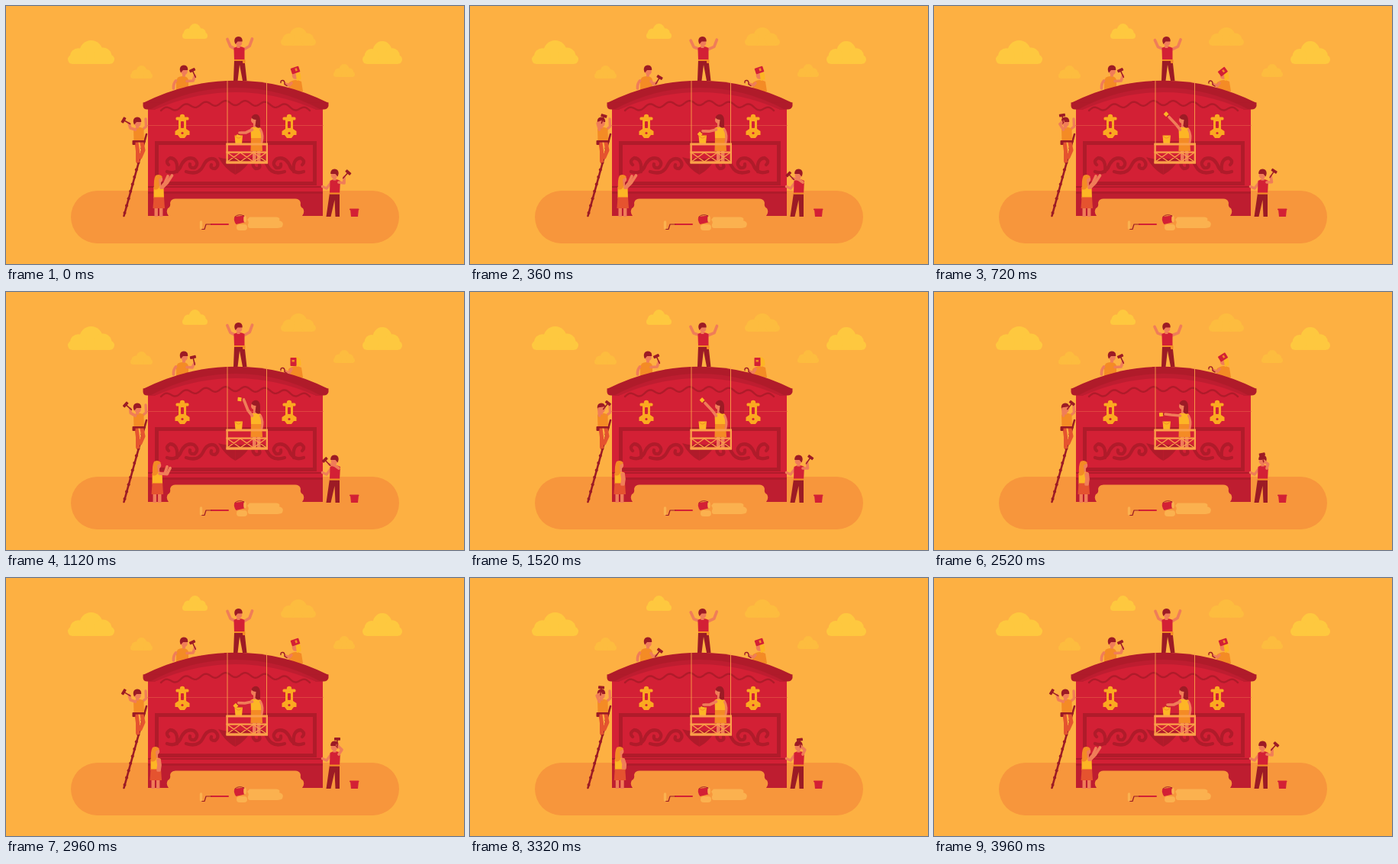
An HTML page that plays this animation: 600 by 338 pixels, repeating every 4000 ms.

```html
<!DOCTYPE html>
<html lang="en">
<head>
<meta charset="utf-8">
<title>Chest builders</title>
<style>
html, body { margin: 0; width: 100%; height: 100%; overflow: hidden; background: #fdb042; }
svg { display: block; width: 100%; height: 100%; }
</style>
</head>
<body>
<svg id="stage" viewBox="0 0 600 338"></svg>
<script>
const C = {
  sky: '#fdb042', ground: '#f7963c', red: '#d32035', deep: '#be1d30', dark: '#b01b2a',
  maroon: '#9c1b25', skin: '#f07d58', gold: '#fdb525', brass: '#fba920', orange: '#f48b25',
  coral: '#e5532f', cloud: '#fec83f', pale: '#fdbc3f', rope: '#fba149', puddle: '#fbb14f'
};

// Markup helpers
const path = (d, fill) => `<path d="${d}" fill="${fill}"/>`;
const line = (d, color, w, id = '') =>
  `<path id="${id}" d="${d}" fill="none" stroke="${color}" stroke-width="${w}" stroke-linecap="round" stroke-linejoin="round"/>`;
const rect = (x, y, w, h, fill, r = 0) =>
  `<rect x="${x}" y="${y}" width="${w}" height="${h}" rx="${r}" fill="${fill}"/>`;
const disc = (x, y, r, fill) => `<circle cx="${x}" cy="${y}" r="${r}" fill="${fill}"/>`;
const group = (id, body) => `<g id="${id}">${body}</g>`;
const limb = id => line('', C.skin, 3.7, id);
const hammer = id => group(id, line('M0 2V-7', C.maroon, 1.5) + rect(-4, -10, 8, 3.8, C.maroon, .8));

const cloud = (x, y, w, h, fill) =>
  rect(x, y + h * .6, w, h * .4, fill, h * .2) +
  `<ellipse cx="${x + w * .5}" cy="${y + h * .5}" rx="${w * .25}" ry="${h * .5}" fill="${fill}"/>` +
  `<ellipse cx="${x + w * .75}" cy="${y + h * .65}" rx="${w * .19}" ry="${h * .34}" fill="${fill}"/>` +
  `<ellipse cx="${x + w * .23}" cy="${y + h * .66}" rx="${w * .18}" ry="${h * .33}" fill="${fill}"/>`;

// Head with a cap of hair; dir is the side the face looks to
const head = (x, y, dir) =>
  rect(x - 2, y + 3, 4, 6, C.skin) + disc(x + dir * .6, y + 2.5, 4.2, C.skin) +
  path(`M${x - dir * 4} ${y + 4}C${x - dir * 7} ${y - 2} ${x - dir * 4} ${y - 6} ${x} ${y - 6}
    C${x + dir * 4} ${y - 6} ${x + dir * 5.5} ${y - 3} ${x + dir * 5.2} ${y + .5}H${x - dir}Z`, C.maroon);

function clouds() {
  return cloud(81, 45, 61, 31, C.cloud) + cloud(231, 23, 33, 20, C.cloud) +
    cloud(467, 46, 52, 30, C.cloud) + cloud(360, 28, 46, 24, C.pale) +
    cloud(163, 78, 29, 17, C.pale) + cloud(429, 76, 28, 17, C.pale);
}

function topMan() {
  return path('M299 71H312.500L315.5 98H310L306 77L303.500 98H298Z', C.maroon) +
    limb('cheerL') + limb('cheerR') +
    path('M298.5 55Q305.5 51 312.5 55L312.500 72H299Z', C.red) +
    rect(299, 70, 13.5, 2, C.orange) + rect(310, 70, 3.5, 5, C.orange, 1) +
    head(304.5, 46, 1);
}

function roofMan() {
  return path('M223 98Q224 92 231 92Q238 92 239 97V111H223Z', C.orange) +
    line('M222.5 98Q219 102 219.5 108', C.skin, 3.7) +
    head(233, 83.5, 1) + limb('roofArm') + hammer('roofHammer');
}

function welder() {
  return path('M370 101Q378 94 387 99L389 112H370Z', C.orange) +
    disc(379.5, 91, 4.8, C.skin) + path('M379 85Q387 84 386.5 96L381 98Z', C.gold) +
    limb('weldArm') +
    group('torch', line('M-3 1Q-3.5 -2.5 0 -2Q2.5 -1 2 3L5 5', C.maroon, 1.4)) +
    group('mask', rect(-4, -5.5, 8, 11, C.red, .8) + rect(-2, -2.5, 3.5, 2.5, C.orange));
}

// Region under a circular arc from (x1, y) to (x2, y) whose crown is at top
function arch(x1, x2, y, top, fill) {
  const half = (x2 - x1) / 2, rise = y - top, r = (half * half + rise * rise) / (2 * rise);
  return path(`M${x1} ${y}A${r} ${r} 0 0 1 ${x2} ${y}Z`, fill);
}

function ripple() {
  let d = '';
  for (let x = 203; x <= 398; x += 1.5) {
    const y = 127 + (x - 300.5) ** 2 / 950 + 3 * Math.cos(2 * Math.PI * (x - 300.5) / 26);
    d += (d ? 'L' : 'M') + x + ' ' + y.toFixed(1);
  }
  return line(d, C.dark, 2.4);
}

function chest() {
  const scroll = line('M211 217Q222 221 228 212Q234 196 246 200Q254 206 247 212Q240 213 241 207' +
      'M224 217Q226 200 215 199Q208 203 213 208' +
      'M236 217Q252 222 258 210Q264 197 274 201Q281 208 274 213Q267 213 269 208', C.dark, 4.3) +
    path('M278 198Q290 202 300.500 199V221Q288 215 278 198Z', C.dark);
  return rect(186, 128, 229, 116, C.red) +
    path('M186 243H415V275H388Q392 270 389 265Q385 263 386 258Q385 252.500 379 252.500H222Q216 252.500 215 258Q216 263 212 265Q209 270 213 275H186Z', C.deep) +
    rect(186, 236, 229, 2, C.dark) + rect(186, 243, 229, 3, C.dark) +
    arch(179.5, 422.5, 127, 97.7, C.dark) +
    path('M179.500 126.500H422.500V131Q421 136 415 135.500H186Q180 136 179.500 131Z', C.dark) +
    arch(189, 412, 135.6, 107, C.deep) + arch(196, 405, 135.6, 113, C.red) +
    rect(196, 135, 209, 3, C.red) + ripple() +
    line('M186 156.500H415', '#e0433f', 1.2) +
    rect(195, 177, 212, 58, C.dark) + rect(200, 182, 202, 48, C.red) +
    `<g>${scroll}</g><g transform="translate(601) scale(-1 1)">${scroll}</g>`;
}

const latch = x =>
  disc(x, 145, 3.2, C.brass) + rect(x - 8.5, 145.5, 17, 4, C.brass, 1.5) +
  rect(x - 5, 148, 10, 14, C.brass) + rect(x - 2, 151, 4, 9, C.red, 1) +
  path(`M${x - 5} 161H${x + 5}L${x + 9.5} 164V169H${x + 6}L${x + 3} 173H${x - 3}L${x - 6} 169H${x - 9.5}V164Z`, C.brass) +
  disc(x, 166.5, 1.6, C.red);

const bucket = (x, y, w, h, fill) =>
  path(`M${x} ${y}H${x + w}L${x + w - 1} ${y + h}H${x + 1}Z`, fill);

function painter() {
  return line('M290 98V181M341.500 98V181', C.rope, .9) +
    rect(323, 187, 4.5, 17, C.skin) + rect(329, 187, 4.5, 17, C.skin) +
    path('M320.500 160Q326 156 334 160L335 174H321Z', C.gold) +
    path('M321 173H335L336 190H320.500Z', C.orange) +
    line('M333.500 162Q337.500 169 335 179', C.skin, 3) +
    disc(325.5, 149.5, 4.5, C.skin) + rect(324, 152, 4, 7, C.skin) +
    path('M321.500 146Q324 141 329 142Q333 144 333 150V159Q329 161 326.500 157L327.500 149Q323 149 321.500 146Z', C.maroon) +
    group('brush', line('M0 2V-3', C.maroon, 1.5) + rect(-2.5, -8, 5, 5, C.gold, .6)) + limb('paintArm') +
    bucket(299.5, 169.5, 10.5, 11, C.gold) + line('M300.500 170.500Q304.500 176 309 170.500', C.orange, 1) +
    rect(288.5, 179.5, 54.5, 3, C.rope) + rect(288.5, 190.5, 54.5, 2.2, C.rope) +
    rect(288.5, 203.3, 54.5, 3.4, C.rope) +
    rect(288.5, 180, 2.3, 26, C.rope) + rect(340.7, 180, 2.3, 26, C.rope) +
    line('M290 192L307 204L324 192L341 204M290 204L307 192L324 204L341 192', C.rope, 1.4);
}

function ladderMan() {
  let rungs = '';
  for (let i = 0; i < 11; i++) {
    rungs += disc(181 - i * 2.55, 177 + i * 9.4, 2, C.maroon);
  }
  return line('M184 168L154.500 275', C.maroon, 2.6) + rungs +
    line('M171 179L172.500 190V203M178 179L180 189L176 198', C.coral, 5) +
    line('M178.500 162L183.500 158L183 148', C.skin, 3.4) +
    path('M167 161Q174 156 180.500 161L181 178H167.500Z', C.orange) +
    rect(167, 176, 14.5, 2.6, C.maroon) + rect(165.5, 176, 4, 6, C.maroon, 1) +
    head(172, 151.5, 1) + limb('ladderArm') + hammer('ladderHammer');
}

function girl() {
  return group('girl',
    rect(194.5, 262, 4.4, 14, C.skin) + rect(201, 262, 4.4, 14, C.skin) +
    path('M193.500 237Q200 233 206.500 237L207 252H193.500Z', C.gold) +
    path('M193.500 250.500H207L208 265H192.500Z', C.coral) +
    disc(200.5, 227, 4.7, C.skin) + rect(199, 229, 4, 7, C.skin) +
    path('M205 224Q202 219 196 222Q193 227 194 240Q198 242 201 237L200 227Z', C.orange)) +
    limb('girlFar') + limb('girlNear');
}

function sideMan() {
  return path('M424 245H437L437 276H431.500L430.500 254L425.500 276H419.500Z', C.maroon) +
    line('M426 231L420 239L414.500 236.500', C.skin, 3.5) +
    path('M424.500 229Q431 225 438 229L437 246H424Z', C.red) +
    rect(424, 244.5, 13.2, 2.2, C.orange) + head(430.5, 219.5, -1) +
    limb('sideArm') + hammer('sideHammer') +
    bucket(451, 266, 11, 10, C.red) + rect(450, 265.5, 12.5, 1.8, C.red, .9);
}

function floorTools() {
  return path('M319 276.500H354Q360 277 358 281Q365 283 362 289Q360 291 352 291H320Q316 291 317 286Q319 283 316 280Z', C.puddle) +
    rect(302, 286, 14, 8, C.puddle, 4) +
    path('M299.500 276L312 274.500L314 283L301.500 286Q297.500 281 299.500 276Z', C.red) +
    `<ellipse cx="313" cy="279" rx="1.800" ry="4.500" fill="${C.puddle}"/>` +
    line('M300 276Q305 271.500 312 275', C.maroon, .9) +
    line('M269 286H291', C.red, 2) + line('M269 286H262L260 292.500H256', C.maroon, 1.2) +
    line('M255.500 283V291', C.puddle, 3.4);
}

const stage = document.getElementById('stage');
stage.innerHTML = rect(0, 0, 600, 338, C.sky) + clouds() + rect(85, 242, 430, 69, C.ground, 34.5) +
  topMan() + roofMan() + welder() + chest() + latch(231) + latch(371) + painter() +
  ladderMan() + girl() + sideMan() + floorTools();

// Motion helpers
const $ = id => document.getElementById(id);
const ease = k => k * k * (3 - 2 * k);
const wave = (t, period, shift = 0) => .5 - .5 * Math.cos(2 * Math.PI * (t - shift) / period);

function key(t, keys) {
  const i = keys.findIndex(k => k[0] > t);
  if (i < 0) return keys[keys.length - 1][1];
  const [a, va] = keys[i - 1], [b, vb] = keys[i];
  return va + (vb - va) * ease((t - a) / (b - a));
}

// Blend through evenly spaced poses: elbow x, y, hand x, y, tool angle
function blend(poses, u) {
  const p = u * (poses.length - 1);
  const i = Math.min(Math.floor(p), poses.length - 2);
  return poses[i].map((v, n) => v + (poses[i + 1][n] - v) * (p - i));
}

function moveArm(id, from, pose, tool) {
  const [ex, ey, hx, hy, turn] = pose;
  $(id).setAttribute('d', `M${from}L${ex} ${ey}L${hx} ${hy}`);
  if (tool) place(tool, hx, hy, turn);
}

function place(id, x, y, turn = 0) {
  $(id).setAttribute('transform', `translate(${x} ${y}) rotate(${turn})`);
}

const LADDER = [[163, 160, 161, 153.5, -60], [164, 155, 167.5, 151, -18], [169, 153, 176, 152, 38]];
const ROOF = [[245, 98, 247.5, 91.5, -25], [240, 103, 244, 101.5, 38]];
const SIDE = [[443, 232, 443, 224, 42], [440, 225, 434, 219, 0], [430, 227, 423, 226, -45]];
const PAINT = [[314, 166, 306, 166, 200], [311, 161, 303, 160, 265], [317, 155, 308, 145.5, 315]];

function draw(t) {
  const c = wave(t, 1000);
  moveArm('cheerL', '300.500 56.500', [294 - c, 53 + c, 290 - c, 43.5 + 2 * c]);
  moveArm('cheerR', '311.500 57', [319 + c, 52.5 + c, 322.5 + c, 43 + 1.5 * c]);

  moveArm('ladderArm', '169.500 162', blend(LADDER, c), 'ladderHammer');

  const hit = key(t % 1000, [[0, 0], [120, .18], [320, 1], [520, 0]]);
  moveArm('roofArm', '237 98.500', blend(ROOF, hit), 'roofHammer');

  const swing = key(t % 2000, [[0, 0], [120, .28], [360, 1], [720, .1], [800, 0],
    [960, .5], [1140, 1], [1320, .56], [1520, .08], [1900, 0]]);
  moveArm('sideArm', '436 231', blend(SIDE, swing), 'sideHammer');

  const shut = key(t, [[0, 0], [640, 0], [880, 1], [2320, 1], [2600, 0]]);
  place('mask', 379 - 2.5 * shut, 84 + 7.5 * shut, 72 - 72 * shut);
  const dip = 2 * shut;
  moveArm('weldArm', '374 101', [371, 104 + dip, 366, 102 + dip]);
  place('torch', 363, 99.5 + dip);

  const lift = key(t, [[0, 0], [280, 0], [580, 1], [2300, 1], [2640, .3], [2960, .2], [3240, 0]]);
  const reach = blend(PAINT, lift);
  const stroke = wave(t, 800, 720) * Math.max(0, lift * 2 - 1);
  reach[2] += 3.5 * stroke;
  reach[3] -= 4.5 * stroke;
  reach[4] -= 40 * stroke;
  moveArm('paintArm', '322.500 162', reach, 'brush');

  const up = key(t, [[0, 1], [950, 1], [1300, 0], [3260, 0], [3640, 1]]);
  const dx = -4 * (1 - up);
  place('girl', dx, 0);
  moveArm('girlFar', `${203 + dx} 238`, blend([[200, 245, 199, 252], [208, 238, 211, 229], [208, 232, 212, 223]], up));
  moveArm('girlNear', `${205 + dx} 238`, blend([[202, 245, 201, 252], [211, 239, 215, 231], [211, 232, 217.5, 222]], up));
}

function tick() {
  draw(performance.now() % 4000);
  requestAnimationFrame(tick);
}
tick();
</script>
</body>
</html>
```
